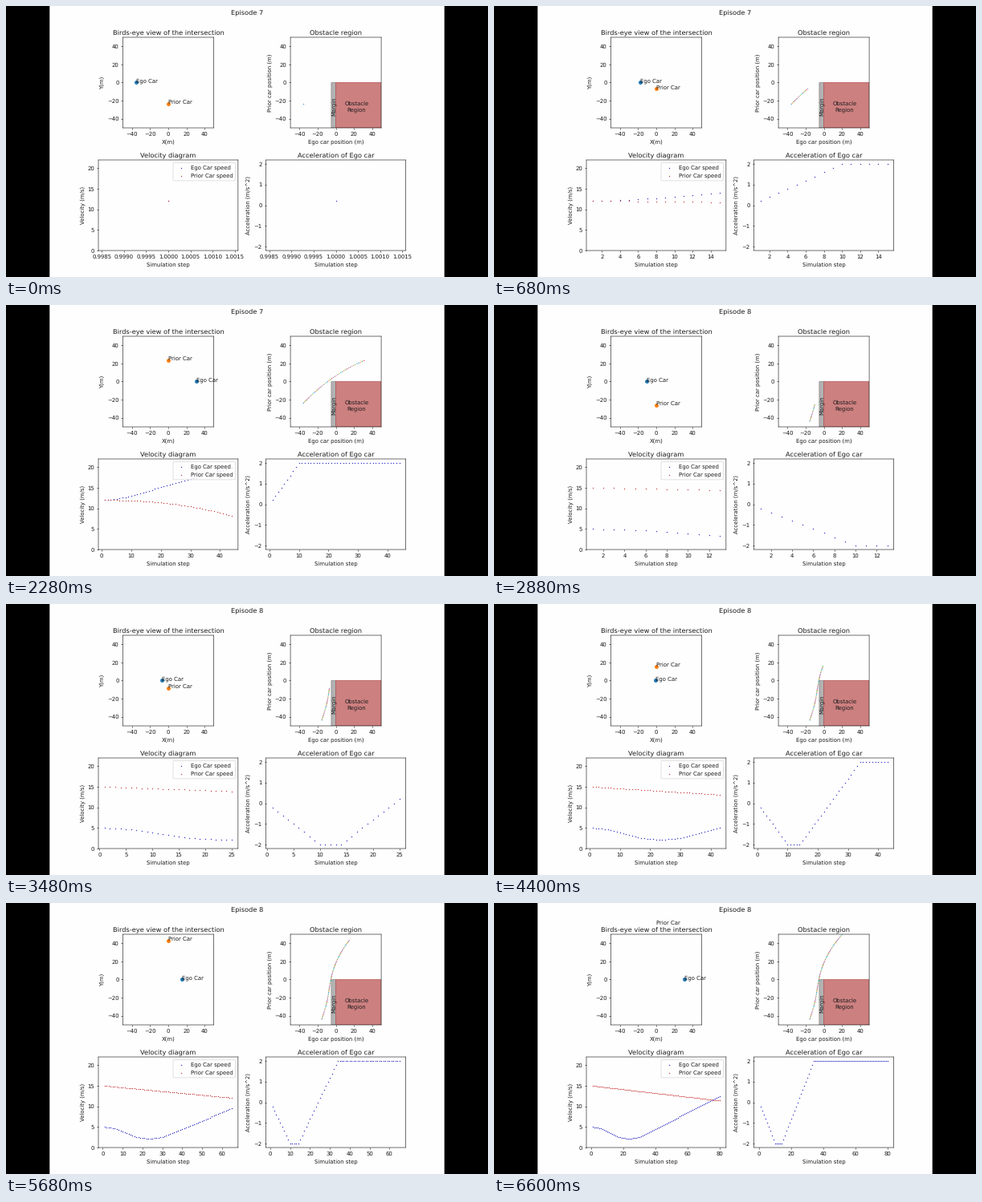
These frames come from a looping animation (600 by 338 pixels, 6640 ms). A matplotlib script:

```python
import numpy as np
import matplotlib.pyplot as plt
from matplotlib.animation import FuncAnimation
from matplotlib.patches import Rectangle

W, H, DPI = 600, 338, 50
FRAMES, INTERVAL = 166, 40
SWITCH = 62  # first frame of the second episode
DT = 0.1
SIZE = 9.87
BLUE, RED, INK = "#3838c8", "#cc4444", "#1a1a1a"

plt.rcParams.update({
    "font.family": "DejaVu Sans",
    "font.size": SIZE,
    "axes.titlesize": 1.2 * SIZE,
    "figure.titlesize": 1.2 * SIZE,
    "figure.facecolor": "#fefefe",
    "axes.facecolor": "#fefefe",
    "text.color": INK,
    "axes.labelcolor": INK,
    "xtick.labelcolor": INK,
    "ytick.labelcolor": INK,
    "text.hinting": "none",
    "path.snap": False,
})


class Episode:
    """Precomputed run of both cars, one entry per simulation step."""

    def __init__(self, number, count, accel, ego, prior, drop, power, pace):
        self.number, self.count, self.pace = number, count, pace
        self.steps = np.arange(1, count + 1)
        self.accel = np.clip(accel(self.steps), -2, 2)
        (ego_x0, ego_v0), (prior_x0, prior_v0) = ego, prior
        self.ego_v = ego_v0 + DT * np.cumsum(self.accel)
        self.prior_v = prior_v0 - drop * np.linspace(0, 1, count) ** power
        self.ego_x = self.travel(ego_x0, self.ego_v)
        self.prior_x = self.travel(prior_x0, self.prior_v)

    @staticmethod
    def travel(start, speed):
        return start + DT * np.concatenate([[0], np.cumsum(speed[:-1])])

    def step_at(self, t):
        """Playback slows down a little as the plots fill up."""
        start, rate, slow = self.pace
        return min(self.count, round(start + rate * t - slow * t * t))


first = Episode(7, 44, lambda n: 0.2 * n, ego=(-35.7, 12), prior=(-23.7, 12),
                drop=3.8, power=2.3, pace=(1, 0.887, 0.002325))
second = Episode(8, 80, lambda n: 0.2 * abs(n - 12) - 2.4, ego=(-15.4, 5),
                 prior=(-43.5, 15), drop=3.6, power=1, pace=(4, 0.873, 0.00131))

fig, ((bird, region), (speed, acc)) = plt.subplots(
    2, 2, figsize=(W / DPI, H / DPI), dpi=DPI)
fig.subplots_adjust(left=115 / W, right=497.5 / W, bottom=33 / H,
                    top=299 / H, wspace=0.2, hspace=0.354)
BAR = 54.3
for x in (0, W - BAR):
    fig.add_artist(Rectangle((x / W, 0), BAR / W, 1, fc="black", lw=0,
                             transform=fig.transFigure))
title = fig.suptitle("", x=0.5, y=1 - 4.4 / H)


def label(ax, name, xlabel, ylabel):
    ax.set_title(name)
    ax.set_xlabel(xlabel)
    ax.set_ylabel(ylabel)


def dots(ax, color, **kw):
    return ax.scatter([], [], s=1, color=color, **kw)


label(bird, "Birds-eye view of the intersection", "X(m)", "Y(m)")
label(region, "Obstacle region", "Ego car position (m)", "Prior car position (m)")
label(speed, "Velocity diagram", "Simulation step", "Velocity (m/s)")
label(acc, "Acceleration of Ego car", "Simulation step", "Acceleration (m/s^2)")

for ax in (bird, region):
    ax.set(xlim=(-50, 50), ylim=(-50, 50), aspect="equal",
           xticks=range(-40, 41, 20), yticks=range(-40, 41, 20))
speed.set(ylim=(0, 22), yticks=range(0, 21, 5))
acc.set(ylim=(-2.2, 2.2), yticks=range(-2, 3))
for ax in (speed, acc):
    ax.ticklabel_format(axis="x", useOffset=False)

ego_dot = bird.scatter([], [], color="C0")
prior_dot = bird.scatter([], [], color="C1")
ego_text = bird.text(0, 0, "Ego Car")
prior_text = bird.text(0, 0, "Prior Car")

region.add_patch(Rectangle((-5, -50), 5, 50, fc="#b2b2b2", ec="#858585"))
region.add_patch(Rectangle((0, -50), 50, 50, fc="#cd8080", ec="#b05050"))
region.text(23, -27, "Obstacle\nRegion", ha="center", va="center")
region.text(-2.3, -26, "Margin", rotation=90, ha="center", va="center")
trace = dots(region, "C0", alpha=0.7)
cycle = [f"C{i % 10}" for i in range(second.count)]

ego_speed = dots(speed, BLUE, label="Ego Car speed")
prior_speed = dots(speed, RED, label="Prior Car speed")
speed.legend(loc="upper right")
ego_acc = dots(acc, BLUE)


def place(dot, text, x, y):
    dot.set_offsets([[x, y]])
    text.set_position((x, y))


def update(frame):
    if frame < SWITCH:
        ep, t = first, frame
    else:
        ep, t = second, frame - SWITCH
    n = ep.step_at(t)
    title.set_text(f"Episode {ep.number}")
    place(ego_dot, ego_text, ep.ego_x[n - 1], 0)
    place(prior_dot, prior_text, 0, ep.prior_x[n - 1])

    trace.set_offsets(np.c_[ep.ego_x[:n], ep.prior_x[:n]])
    trace.set_color(cycle[:n])
    for dot, values in ((ego_speed, ep.ego_v), (prior_speed, ep.prior_v),
                        (ego_acc, ep.accel)):
        dot.set_offsets(np.c_[ep.steps[:n], values[:n]])

    pad = 0.05 * (n - 1) or 0.001575
    for ax in (speed, acc):
        ax.set_xlim(1 - pad, n + pad)
    return []


anim = FuncAnimation(fig, update, frames=FRAMES, interval=INTERVAL,
                     init_func=lambda: update(0), repeat=True, repeat_delay=0)
plt.show()
```
